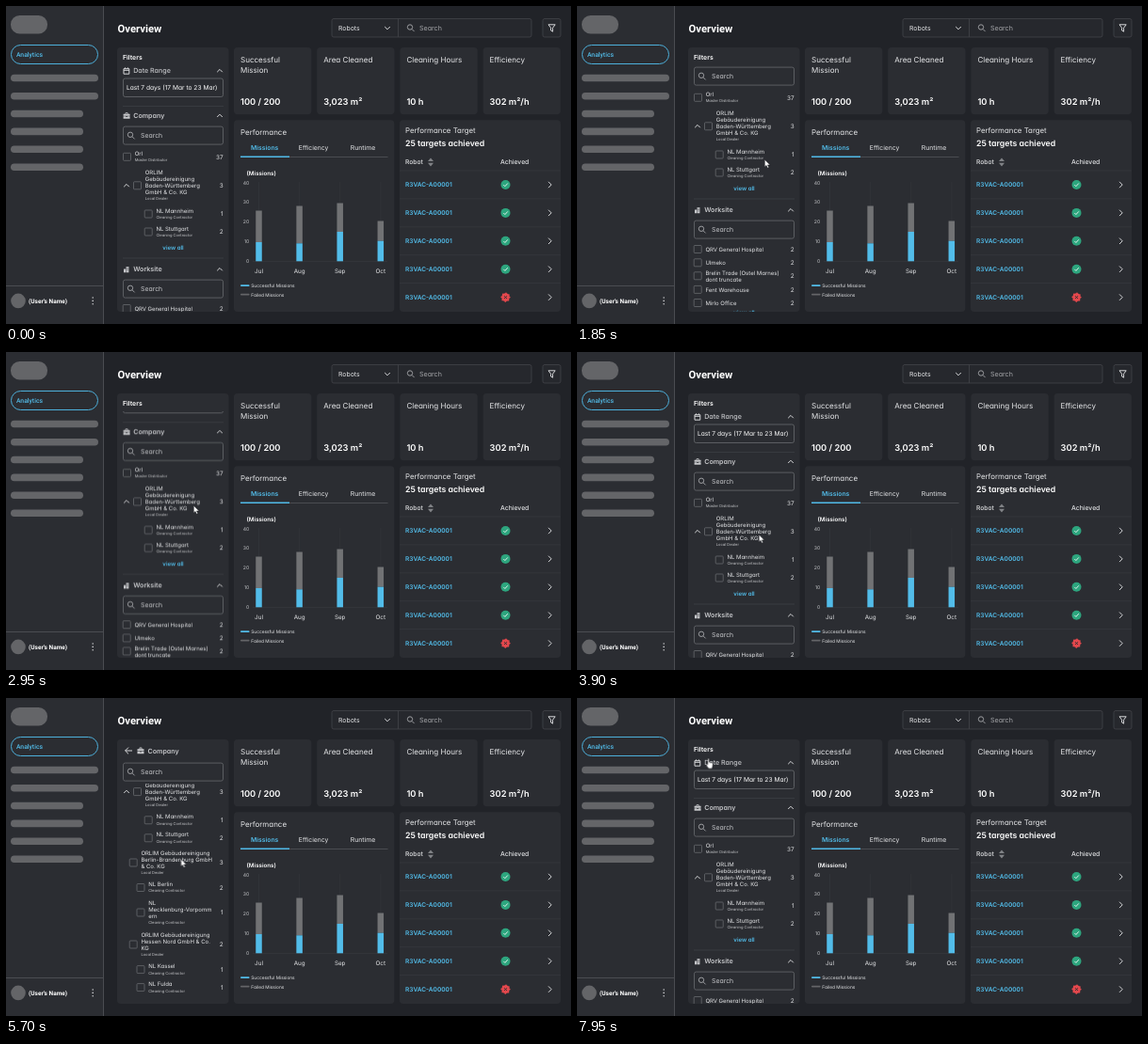
These frames come from a looping animation (600 px wide and 338 px high, 8 s). An HTML page:

```html
<!DOCTYPE html>
<html lang="en">
<head>
<meta charset="utf-8">
<title>Overview</title>
<style>
  html, body { margin: 0; height: 100%; overflow: hidden; background: #212328; }
  svg { display: block; width: 100vw; height: 100vh; }
  text {
    font-family: Inter, sans-serif; font-feature-settings: "cv11";
    text-rendering: geometricPrecision; fill: #e4e5e7; white-space: pre;
  }
  .roboto { font-family: Roboto, sans-serif; }
  .white { fill: #fff; }
  .soft { fill: #c6c7ca; }
  .dim { fill: #a5a6aa; }
  .blue { fill: #52bce9; }
  .mid { font-weight: 500; }
  .bold { font-weight: 600; }
  .end { text-anchor: end; }
  .center { text-anchor: middle; }
  .card { fill: #2b2d32; }
  .pill { fill: #646568; }
  .rule { fill: none; stroke: #3d3f44; stroke-width: .8; }
  .edge { fill: none; stroke: #4a4c51; }
  .input { fill: #26282d; stroke: #43454a; stroke-width: .8; }
  .field { fill: none; stroke: #696b6f; stroke-width: .8; }
  .line { fill: none; stroke: #d6d7d9; stroke-width: 1; }
  .lens { fill: none; stroke: #a5a6aa; stroke-width: .9; }
  .active { fill: none; stroke: #4db0db; }

  .seen, .arrow, .hand, .main, .sub, .scroll, .list, .pointer {
    animation: 8s step-end infinite;
  }
  .seen { animation-name: seen; }
  .arrow { animation-name: arrow; }
  .hand { animation-name: hand; }
  .main { animation-name: main; }
  .sub { animation-name: sub; }
  .scroll { animation-name: scroll; }
  .list { animation-name: list; }
  .pointer { animation-name: pointer; }

  @keyframes seen { 0% { opacity: 0 } 6.25%, 100% { opacity: 1 } }
  @keyframes arrow {
    0%, 65% { opacity: 1 }
    52.5%, 91.25%, 100% { opacity: 0 }
  }
  @keyframes hand {
    0%, 65% { opacity: 0 }
    52.5%, 91.25%, 100% { opacity: 1 }
  }
  @keyframes main { 0%, 95%, 100% { opacity: 1 } 58.75% { opacity: 0 } }
  @keyframes sub { 0%, 95%, 100% { opacity: 0 } 58.75% { opacity: 1 } }
  @keyframes scroll {
    0% { transform: translateY(0) }
    20.625% { transform: translateY(-31.5px) }
    23.125% { transform: translateY(-63px) }
    25% { transform: translateY(-63px); animation-timing-function: steps(9, start) }
    31.25% { transform: translateY(-183.2px) }
    33.75% { transform: translateY(-183.2px); animation-timing-function: steps(6, start) }
    37.499% { transform: translateY(-31.7px) }
    37.5%, 100% { transform: translateY(0) }
  }
  @keyframes list {
    0%, 78.75%, 100% { transform: translateY(0) }
    71.25% { transform: translateY(-32px) }
    78.125% { transform: translateY(-16px) }
  }
  @keyframes pointer {
    0% { transform: translate(590px, 173px) }
    6.25% { transform: translate(590px, 173px); animation-timing-function: steps(4, start) }
    8.75% { transform: translate(505px, 172px); animation-timing-function: steps(7, start) }
    13.125% { transform: translate(265px, 165.5px); animation-timing-function: steps(6, start) }
    16.875% { transform: translate(203.5px, 163.5px); animation-timing-function: steps(3, start) }
    18.75% { transform: translate(199px, 163px) }
    46.875% { transform: translate(199px, 163px); animation-timing-function: steps(12, start) }
    54.375% { transform: translate(180.5px, 255.5px) }
    64.375% { transform: translate(180.5px, 255.5px); animation-timing-function: steps(6, start) }
    68.125% { transform: translate(185.5px, 171px) }
    82.5% { transform: translate(185.5px, 171px); animation-timing-function: steps(4, start) }
    85% { transform: translate(149.5px, 85.5px); animation-timing-function: steps(3, start) }
    86.875% { transform: translate(121px, 41px) }
    88.75% { transform: translate(121px, 41px); animation-timing-function: steps(7, start) }
    93.125% { transform: translate(124.5px, 57px) }
    99.375%, 100% { transform: translate(136.8px, 64.3px) }
  }
</style>
</head>
<body>
<svg id="stage" viewBox="0 0 600 338"></svg>
<script>
const text = (x, y, size, str, cls = '') =>
  `<text x="${x}" y="${y}" font-size="${size}" class="${cls}">${str}</text>`;
const rect = (x, y, w, h, cls, r = 0) =>
  `<rect x="${x}" y="${y}" width="${w}" height="${h}" rx="${r}" class="${cls}"/>`;
const path = (d, cls = 'line', opacity = 1) => `<path d="${d}" class="${cls}" opacity="${opacity}"/>`;
const at = (x, y, body) => `<g transform="translate(${x} ${y})">${body}</g>`;

const up = (x, y) => path(`M${x - 2.8} ${y + 1.4}l2.8-2.8 2.8 2.8`);
const down = (x, y) => path(`M${x - 2.8} ${y - 1.4}l2.8 2.8 2.8-2.8`);
const lens = (x, y) =>
  `<circle cx="${x - .8}" cy="${y - .8}" r="2.7" class="lens"/>` + path(`M${x + 1.2} ${y + 1.2}l2.6 2.6`, 'lens');
const rule = y => path(`M124 ${y}H231`, 'rule');

const icons = {
  date: '<path d="M.4 1.3H6.2V6.8H.4ZM.4 2.9H6.2M1.9 0V1.5M4.7 0V1.5" class="line"/>',
  firm: '<path d="M0 1.6H2V.8Q2 0 2.8 0H4.2Q5 0 5 .8V1.6H7V3.6H0ZM2.8 1.6H4.2V.8H2.8ZM0 4.1H2.8V4.9H4.2V4.1H7V6.6H0Z" class="soft" fill-rule="evenodd"/>',
  site: '<path d="M.4 3H2.6V6.8H.4ZM3 .4H5.8V6.8H3Z" class="soft"/><path d="M3.8 1.5H5M3.8 3H5M3.8 4.5H5" stroke="#2b2d32" stroke-width=".6"/>',
  robot: '<path d="M.4.2H6V2H.4ZM.4 2.5H6V4.3H.4ZM.4 4.8H6V6.6H.4Z" class="soft"/>'
};

const search = y => rect(124.5, y - 9.5, 106, 19, 'field', 2) + lens(132.8, y)
  + text(143, y + 2.5, 6.9, 'Search', 'soft');
const section = (y, name, icon, weight = 'bold') =>
  at(124.6, y - 3.4, icons[icon]) + text(135.2, y + 2.5, 7.1, name, 'soft ' + weight) + up(227, y);
const viewAll = y => text(177.5, y + 2.2, 6.1, 'view all', 'blue bold center');

// A checkbox row: its lines and small note are centred on y.
function row(x, y, label, note, count) {
  const lines = label.split('|');
  const top = y - 3.5 * (lines.length - (note ? 0 : 1)) + 2.2;
  return rect(x, y - 4, 8, 8, 'field', .8)
    + lines.map((s, i) => text(x + 12.2, top + 7.1 * i, 6, s)).join('')
    + (note ? text(x + 12.2, y + 3.5 * lines.length + 1.4, 4.05, note, 'soft') : '')
    + (count ? text(230.6, y + 2.3, 6.4, count, 'end') : '');
}
const dealer = 'Local Dealer', contractor = 'Cleaning Contractor';

const firms = row(124.5, 160.3, 'Orl', 'Master Distributor', 37)
  + up(128, 190.8)
  + row(135.5, 190.8, 'ORLIM|Gebäudereinigung|Baden-Württemberg|GmbH &amp; Co. KG', dealer, 3)
  + row(147.2, 221, 'NL Mannheim', contractor, 1)
  + row(147.2, 240, 'NL Stuttgart', contractor, 2);

const sites = [
  [321.5, 'QRV General Hospital'], [335.8, 'Ulmeko'],
  [349.8, 'Brelin Trade (Ostel Marnes)|dont truncate'],
  [364.4, 'Fent Warehouse'], [378.5, 'Mirlo Office']
].map(([y, s]) => row(124.2, y, s, '', 2)).join('');
const robots = [1, 2, 3, 4, 5].map(n => row(124.2, 440 + 14.1 * n, `R3-22000${n}-SCR`)).join('');

const mainPage = `<g class="main">${text(124, 57, 6.9, 'Filters', 'bold white')}
  <g clip-path="url(#tall)"><g class="scroll">
  ${section(68.8, 'Date Range', 'date', 'mid')}
  ${rect(124.5, 77, 106, 19.5, 'field', 2)}${text(128, 89.3, 6.65, 'Last 7 days (17 Mar to 23 Mar)', 'white')}
  ${rule(106.5)}${section(116.6, 'Company', 'firm')}${search(137.6)}${firms}${viewAll(256.5)}
  ${rule(268)}${section(279.9, 'Worksite', 'site')}${search(300.6)}${sites}${viewAll(388.7)}
  ${rule(400)}${section(412, 'Robot ID', 'robot')}${search(433.2)}${robots}
  </g></g></g>`;

const subPage = `<g class="sub">
  ${path('M134 56H126.6M130 52.6L126.6 56L130 59.4')}
  ${at(139.5, 52.6, icons.firm)}${text(150.5, 58.5, 7.1, 'Company', 'soft bold')}${search(78.6)}
  <g clip-path="url(#short)"><g class="list">${at(0, -59.2, firms)}
  ${row(131.2, 207, 'ORLIM Gebäudereinigung|Berlin-Brandenburg GmbH|&amp; Co. KG', dealer, 3)}
  ${row(139, 233.5, 'NL Berlin', contractor, 2)}
  ${row(139, 260, 'NL|Mecklenburg-Vorpomm|ern', contractor, 1)}
  ${row(131.2, 294, 'ORLIM Gebäudereinigung|Hessen Nord GmbH &amp; Co.|KG', dealer, 2)}
  ${row(139, 320.6, 'NL Kassel', contractor, 1)}
  ${row(139, 339.6, 'NL Fulda', contractor, 1)}
  </g></g></g>`;

const sidebar = rect(0, 0, 103, 338, 'card') + path('M103.5 0V338', 'edge')
  + rect(5, 10, 39, 19.5, 'pill', 9.5)
  + rect(5.5, 41.5, 92, 20, 'active', 10)
  + text(11, 53.7, 6.8, 'Analytics', 'roboto blue mid')
  + [76.5, 95.7, 114.5, 133.4, 152.3, 171.2].map((y, i) =>
      rect(5, y - 3.8, i < 2 ? 93 : 77, 7.6, 'pill', 3.8)).join('')
  + path('M0 297.5H103', 'edge')
  + '<circle cx="13" cy="313.4" r="7.8" class="pill"/>'
  + text(24, 315.8, 6.5, "(User's Name)", 'roboto bold white')
  + [310, 313.4, 316.8].map(y => `<circle cx="92.2" cy="${y}" r=".8" class="soft"/>`).join('');

const topbar = text(118.5, 27.5, 11.3, 'Overview', 'roboto bold white')
  + rect(346, 13.5, 212, 19.5, 'input', 2) + path('M416.5 13.5V33', 'input')
  + text(353, 25.8, 6.9, 'Robots') + down(405, 23.4) + lens(429.8, 23.3)
  + text(439, 25.8, 7.1, 'Search', 'dim')
  + rect(570, 13.5, 19, 19.5, 'input', 2)
  + path('M576 19.8H583.2L580.6 23.2V27.2L578.6 26V23.2Z');

const cards = [
  ['Successful|Mission', '100 / 200'], ['Area Cleaned', '3,023 m²'],
  ['Cleaning Hours', '10 h'], ['Efficiency', '302 m²/h']
].map(([name, value], i) => at(242 + 88.2 * i, 44,
  rect(0, 0, 82.3, 71.2, 'card', 4)
  + name.split('|').map((s, k) => text(7, 16.3 + 11 * k, 8.05, s)).join('')
  + text(7, 60.5, 9.3, value, 'bold white'))).join('');

const bars = [['Jul', 217.5, 251], ['Aug', 212.5, 252.3], ['Sep', 209.5, 240], ['Oct', 228.5, 249.7]]
  .map(([month, top, split], i) => {
    const x = 268.5 + 43.1 * i;
    return path(`M${x} 187V271`, 'rule', .45)
      + `<rect x="${x - 3.25}" y="${top}" width="6.5" height="${split - top}" fill="#717274"/>`
      + rect(x - 3.25, split, 6.5, 271.3 - split, 'blue')
      + text(x, 284.2, 6.3, month, 'center');
  }).join('');

const chart = rect(242, 121.2, 170.3, 203.8, 'card', 4)
  + text(249, 136.8, 7.95, 'Performance')
  + text(274.7, 153.2, 6.8, 'Missions', 'blue bold center')
  + text(326.6, 153.2, 6.8, 'Efficiency', 'center') + text(379, 153.2, 6.9, 'Runtime', 'center')
  + path('M249 160.5H405.5', 'edge') + rect(249, 159.5, 52, 1.5, 'blue')
  + text(255.5, 179.7, 6.2, '(Missions)', 'bold white')
  + [40, 30, 20, 10, 0].map((n, i) => text(258.2, 189.6 + 20.8 * i, 5.1, n, 'soft end')).join('')
  + path('M262 271.4H405', 'rule', .6) + bars
  + rect(249, 296.2, 9.6, 1.8, 'blue', .8) + text(260.3, 298.9, 4.8, 'Successful Missions')
  + rect(249, 305.8, 9.6, 1.8, 'pill', .8) + text(260.3, 308.5, 4.8, 'Failed Missions');

const done = '<circle r="5" fill="#2da57e"/><path d="M-2.2 .1L-.6 1.7 2.3-1.5" fill="none" stroke="#eef6f3" stroke-width=".9"/>';
const failed = '<circle r="4.3" fill="#e5484d" stroke="#e5484d" stroke-width="1.7" stroke-linecap="round" stroke-dasharray="0 3.377"/>'
  + '<path d="M-1.5-1.5L1.5 1.5M1.5-1.5L-1.5 1.5" stroke="#2b2d32" stroke-width=".9"/>';
const targets = rect(418, 121.2, 171, 203.8, 'card', 4)
  + text(424, 135.4, 7.85, 'Performance Target')
  + text(424, 149.4, 8.75, '25 targets achieved', 'bold white')
  + text(424, 168.1, 6.7, 'Robot', 'mid')
  + path('M448 165L451 161.4L454 165ZM448 166.8H454L451 170.4Z', 'dim', .7)
  + text(525, 168.1, 6.8, 'Achieved', 'mid')
  + [0, 1, 2, 3, 4].map(i => {
      const y = 190 + 29.9 * i;
      return path(`M418 ${y - 15}H589`, 'rule', .6)
        + text(424, y + 2.3, 6.55, 'R3VAC-A00001', 'blue bold')
        + at(530.5, y, i < 4 ? done : failed)
        + path(`M576 ${y - 3.2}l3.2 3.2-3.2 3.2`);
    }).join('');

const pointer = `<g class="seen"><g class="pointer" stroke="#15161a" stroke-width=".5" stroke-linejoin="round" fill="#fff">
  <path class="arrow" d="M.3.2V8L2.1 6.4 3.4 9.2 4.8 8.6 3.5 5.9H6.1Z"/>
  <path class="hand" d="M2 .9Q2 .1 2.8.1T3.6.9V4L6.6 4.6Q7.6 4.9 7.5 5.9L7.1 8.6 6.5 10.8H3.1L.5 7.4Q.1 6.6.8 6.2 1.4 6 2 6.8Z"/>
</g></g>`;

document.getElementById('stage').innerHTML = `<defs>
  <clipPath id="tall"><rect x="119" y="63" width="117" height="262"/></clipPath>
  <clipPath id="short"><rect x="119" y="91" width="117" height="234"/></clipPath></defs>`
  + sidebar + topbar + rect(118, 44, 118.5, 281, 'card', 4)
  + mainPage + subPage + cards + chart + targets + pointer;
</script>
</body>
</html>
```
